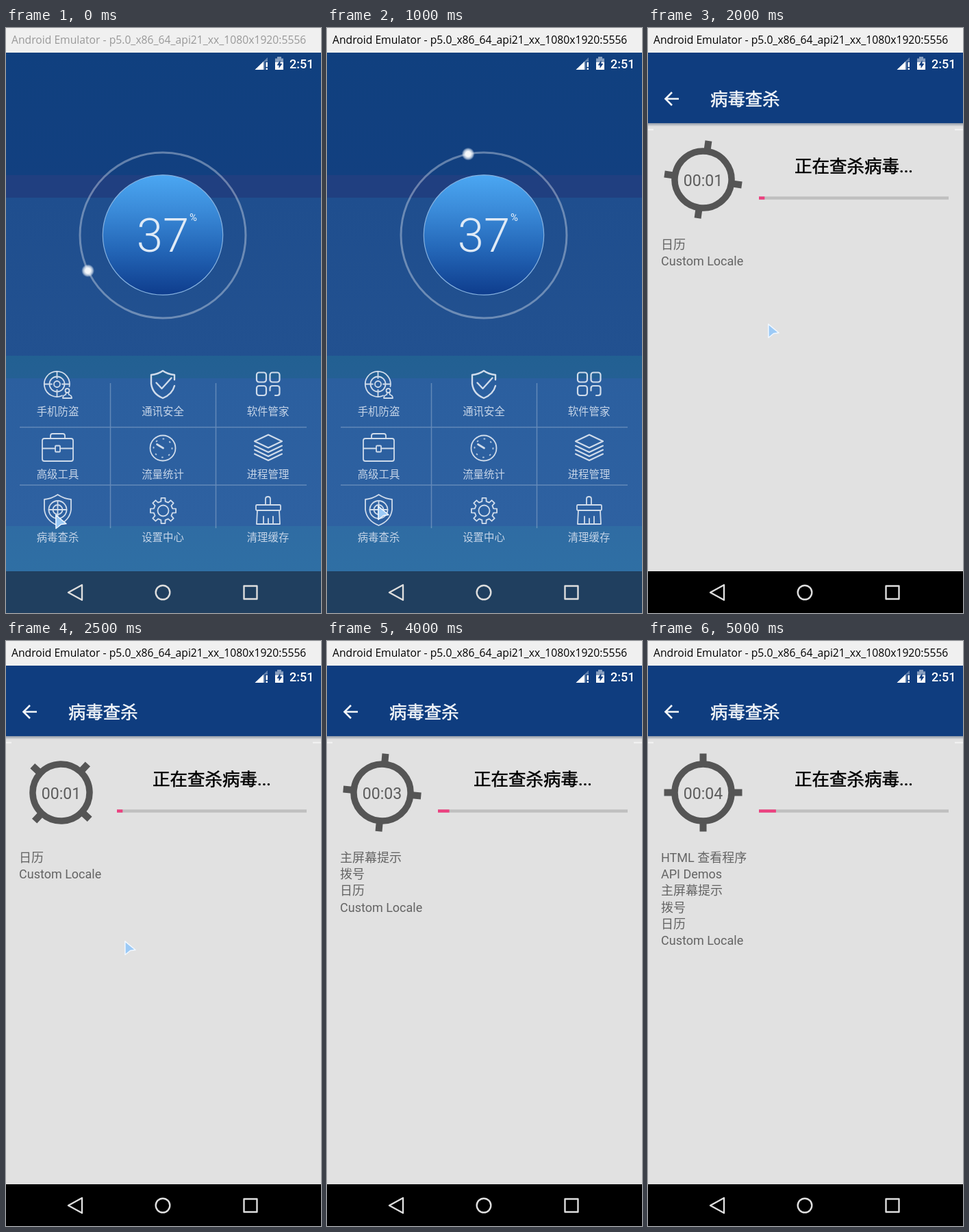
These frames come from a looping animation (460x855 px, 5500 ms). An HTML page:

```html
<!DOCTYPE html>
<html lang="zh-CN">
<head>
<meta charset="utf-8">
<style>
html, body { margin: 0; width: 100%; height: 100%; overflow: hidden; background: #f0f0f0; }
svg { display: block; width: 460px; height: 855px; }
text { font-family: Roboto, "Noto Sans CJK SC", "Noto Sans CJK", sans-serif; }
.title { font: 15.7px "Open Sans", "Noto Sans", sans-serif; }
.icons { fill: none; stroke: #d0dceb; stroke-width: 1.8; stroke-linejoin: round; stroke-linecap: round; }
.labels { font-size: 15.4px; font-weight: 300; fill: #c6d5e8; text-anchor: middle; }
.nav { fill: none; stroke: #dedede; stroke-width: 2.4; stroke-linejoin: round; }
.mid { text-anchor: middle; }
.strong { stroke-width: .5; }
</style>
</head>
<body>
<svg viewBox="0 0 460 855">
  <defs>
    <linearGradient id="sky" gradientUnits="userSpaceOnUse" x1="0" y1="36" x2="0" y2="794">
      <stop offset="0" stop-color="#10407f"/>
      <stop offset=".236" stop-color="#124080"/>
      <stop offset=".236" stop-color="#203f80"/>
      <stop offset=".28" stop-color="#203f80"/>
      <stop offset=".28" stop-color="#1f4e8e"/>
      <stop offset=".585" stop-color="#225190"/>
      <stop offset=".585" stop-color="#226092"/>
      <stop offset=".628" stop-color="#246094"/>
      <stop offset=".628" stop-color="#2b5f9f"/>
      <stop offset=".913" stop-color="#2e61a1"/>
      <stop offset=".913" stop-color="#2f6ca3"/>
      <stop offset="1" stop-color="#2f6fa4"/>
    </linearGradient>
    <linearGradient id="disc" x2="0" y2="1">
      <stop offset="0" stop-color="#4ba7f2"/>
      <stop offset=".3" stop-color="#3a8ad8"/>
      <stop offset=".62" stop-color="#2467b8"/>
      <stop offset="1" stop-color="#0e3c8c"/>
    </linearGradient>
    <radialGradient id="glow">
      <stop offset=".4" stop-color="#f4f7fa"/>
      <stop offset=".7" stop-color="#e6edf5" stop-opacity=".7"/>
      <stop offset="1" stop-color="#dfe8f2" stop-opacity="0"/>
    </radialGradient>
    <linearGradient id="shade" x2="0" y2="1">
      <stop offset="0" stop-color="#8f98a5"/>
      <stop offset="1" stop-color="#e1e1e1"/>
    </linearGradient>
  </defs>

  <rect width="460" height="36" fill="#f0f0f0"/>
  <text id="title" class="title" x="8" y="23">Android Emulator - p5.0_x86_64_api21_xx_1080x1920:5556</text>

  <g id="menu">
    <rect y="36" width="460" height="758" fill="url(#sky)"/>
    <rect y="794" width="460" height="61" fill="#203f5f"/>
    <circle cx="229" cy="303" r="121" fill="none" stroke="#fff" stroke-opacity=".34" stroke-width="3"/>
    <circle cx="229" cy="302.5" r="87.7" fill="url(#disc)" stroke="#86b2e0" stroke-width="1.2"/>
    <text class="mid" x="229" y="327" font-size="69" font-weight="300" fill="#dfeaf6">37</text>
    <text x="268" y="282" font-size="15" fill="#eef4fa">%</text>
    <circle id="ball" r="9.5" fill="url(#glow)"/>
    <path d="M20 583.5H439M20 668H439M152.5 519V731M306.5 519V731" stroke="#fff" stroke-opacity=".26" stroke-width="1.5"/>
    <g class="icons">
      <path d="M82 537.3A18.5 18.5 0 1 1 92.5 524M74.5 502v10M56 520.5h11M74.5 529v10M82 520.5h11"/>
      <circle cx="74.5" cy="520.5" r="11"/>
      <circle cx="74.5" cy="520.5" r="4.5"/>
      <circle cx="89.5" cy="530" r="3"/>
      <path d="M88 533l-1 3q-4 1-4 5h13q0-4-4-5l-1-3"/>

      <g stroke-width="2.4">
        <path d="M246 514v-7q-10-1-17-6q-7 5-17 6v13q2 15 17 21q14-6 17-18"/>
        <path d="M219.5 518.5l8 8.5 14-15.5"/>
      </g>
      <g stroke-width="2.2">
        <rect x="366" y="503.5" width="14" height="14" rx="3.5"/>
        <rect x="385.5" y="503.5" width="14" height="14" rx="3.5"/>
        <rect x="366" y="523" width="14" height="14" rx="3.5"/>
        <path d="M385.5 530v-3.5q0-3.5 3.5-3.5h7q3.500 0 3.5 3.5v7q0 3.5-3.5 3.5h-3"/>
      </g>

      <rect x="53" y="600" width="45" height="33" rx="3"/>
      <path d="M65 600v-4q0-3 3-3h15q3 0 3 3v4M53 614.5h19M79 614.5h19"/>
      <rect x="72" y="610.5" width="7" height="9" rx="1"/>

      <circle cx="229" cy="614" r="18.5"/>
      <path d="M220.5 608.5l9 5.5" stroke-width="2.8"/>
      <circle cx="229" cy="614" r="13.5" stroke-width="2" stroke-dasharray="1 9.6" opacity=".8"/>

      <path d="M383 594.5l20 9.5-20 9.5-20-9.5zM363 610.5l20 9.5 20-9.5M363 616.5l20 9.5 20-9.5M363 622.5l20 9.5 20-9.5" stroke-width="2.1"/>

      <path d="M75.5 682q9 6 19.5 7v15q-2 16-19.5 23q-17.5-7-19.5-23v-15q10.5-1 19.5-7z"/>
      <circle cx="75.5" cy="704" r="13"/>
      <circle cx="75.5" cy="704" r="7"/>
      <path d="M75.5 691v26M62.5 704h26"/>

      <path id="gear"/>
      <circle cx="229.5" cy="705.5" r="8"/>

      <path d="M379 697v-9q0-3 3.5-3t3.5 3v9M367 705l-1 20h34l-1-20M376 714v11M383 717v8M390 714v11"/>
      <rect x="365" y="697" width="36" height="8" rx="1.5"/>
    </g>
    <g id="labels" class="labels"></g>
  </g>

  <g id="scan">
    <rect y="36" width="460" height="758" fill="#e1e1e1"/>
    <rect y="36" width="460" height="103" fill="#0f3d7f"/>
    <rect y="139" width="460" height="5" fill="url(#shade)"/>
    <path d="M0 148.5h8M448 148.5h12" stroke="#f4f4f4" stroke-width="2"/>
    <rect y="794" width="460" height="61"/>
    <path d="M45 103.5H26M35 94l-9.5 9.5 9.5 9.5" fill="none" stroke="#f4f7fa" stroke-width="2.6"/>
    <text class="strong" x="91" y="113" font-size="25.4" fill="#f4f7fa" stroke="#f4f7fa">病毒查杀</text>
    <text class="mid strong" x="300.5" y="211" font-size="25.5" stroke="#000">正在查杀病毒...</text>
    <g id="rotor" stroke="#555" fill="none">
      <circle r="41.5" stroke-width="9.5"/>
      <path d="M0-57V-44M0 57V44M-57 0H-44M57 0H44" stroke-width="10"/>
    </g>
    <text id="clock" class="mid" x="80.5" y="230.5" font-size="23" fill="#5c5c5c"></text>
    <rect x="162" y="246.3" width="277" height="4.4" fill="#bfbfbf"/>
    <rect id="bar" x="162" y="246.3" height="4.4" fill="#ec407f"/>
    <g id="list" font-size="18" fill="#646464"></g>
  </g>

  <g fill="#fff">
    <path d="M363.5 61L382 43V49H378V61z" opacity=".35"/>
    <path d="M363.5 61H376V49z"/>
    <path d="M379.5 50h2.5v7h-2.5zM379.5 58.5h2.5V61h-2.5z"/>
    <path d="M396 42h6v2.5h3V51h-12v-6.5h3z" opacity=".5"/>
    <path d="M393 50h12v11h-12z"/>
    <path d="M400.5 47l-5 7.5h3V59l5-7h-3z" fill="#123f80"/>
    <text x="414" y="59" font-size="18" font-weight="500">2:51</text>
  </g>
  <g class="nav">
    <path d="M91 825l20-11v22z"/>
    <circle cx="229" cy="825" r="10.3"/>
    <path d="M347.5 815.5h19v19h-19z"/>
  </g>
  <path id="cursor" d="M.8.8L16 13.5 8.5 14.5 1 20.5z" fill="#9ccaf6" stroke="#f2f8ff" stroke-width="1.5" stroke-linejoin="round"/>
</svg>
<script>
const $ = id => document.getElementById(id);
const STEP = 500, STEPS = 11, SCAN_START = 3;
const labels = ['手机防盗', '通讯安全', '软件管家', '高级工具', '流量统计', '进程管理', '病毒查杀', '设置中心', '清理缓存'];
const apps = ['Custom Locale', '日历', '拨号', '主屏幕提示', 'API Demos', 'HTML 查看程序'];
const cursor = [[72, 711], [74, 698], [74, 698], [74, 698], [175, 432], [173, 438], [213, 417]];
// One entry per scan step: seconds, rotor angle, apps scanned
const scan = [[0, 0, 0], [1, 8, 2], [1, 43, 2], [2, 0, 4], [2, 48, 4], [3, 5, 4], [3, 48, 5], [4, 0, 6]];

const polar = (r, deg, cx, cy) => {
  const a = deg * Math.PI / 180;
  return [cx + r * Math.cos(a), cy + r * Math.sin(a)];
};
const textAt = (x, y, s) => `<text x="${x}" y="${y}">${s}</text>`;

$('labels').innerHTML = labels.map((s, i) =>
  textAt(75.5 + i % 3 * 153.5, 566 + Math.floor(i / 3) * 92, s)).join('');

const teeth = [];
for (let i = 0; i < 8; i++)
  for (const [r, d] of [[14, -13], [18.8, -9], [18.8, 9], [14, 13]])
    teeth.push(polar(r, i * 45 + d, 229.5, 705.5));
$('gear').setAttribute('d', 'M' + teeth.join('L') + 'z');

function drawMenu(n) {
  const [x, y] = polar(121, 154.7 + 52.2 * n, 229, 303);
  $('ball').setAttribute('cx', x);
  $('ball').setAttribute('cy', y);
}

function drawScan(n) {
  const [sec, angle, count] = scan[n];
  $('clock').textContent = '00:0' + sec;
  $('rotor').setAttribute('transform', `translate(80.5 221.5) rotate(${angle})`);
  $('bar').setAttribute('width', count * 4.15);
  $('list').innerHTML = apps.slice(0, count).reverse()
    .map((s, i) => textAt(19, 322.7 + i * 24.35, s)).join('');
}

let last = -1;
function draw(n) {
  const scanning = n >= SCAN_START;
  $('menu').style.display = scanning ? 'none' : '';
  $('scan').style.display = scanning ? '' : 'none';
  $('title').setAttribute('fill', n ? '#000' : '#999');
  scanning ? drawScan(n - SCAN_START) : drawMenu(n);
  const at = cursor[n];
  $('cursor').style.display = at ? '' : 'none';
  if (at) $('cursor').setAttribute('transform', `translate(${at})`);
}

const start = performance.now();
function tick() {
  const n = Math.floor((performance.now() - start) / STEP) % STEPS;
  if (n !== last) draw(last = n);
  requestAnimationFrame(tick);
}
tick();
</script>
</body>
</html>
```
